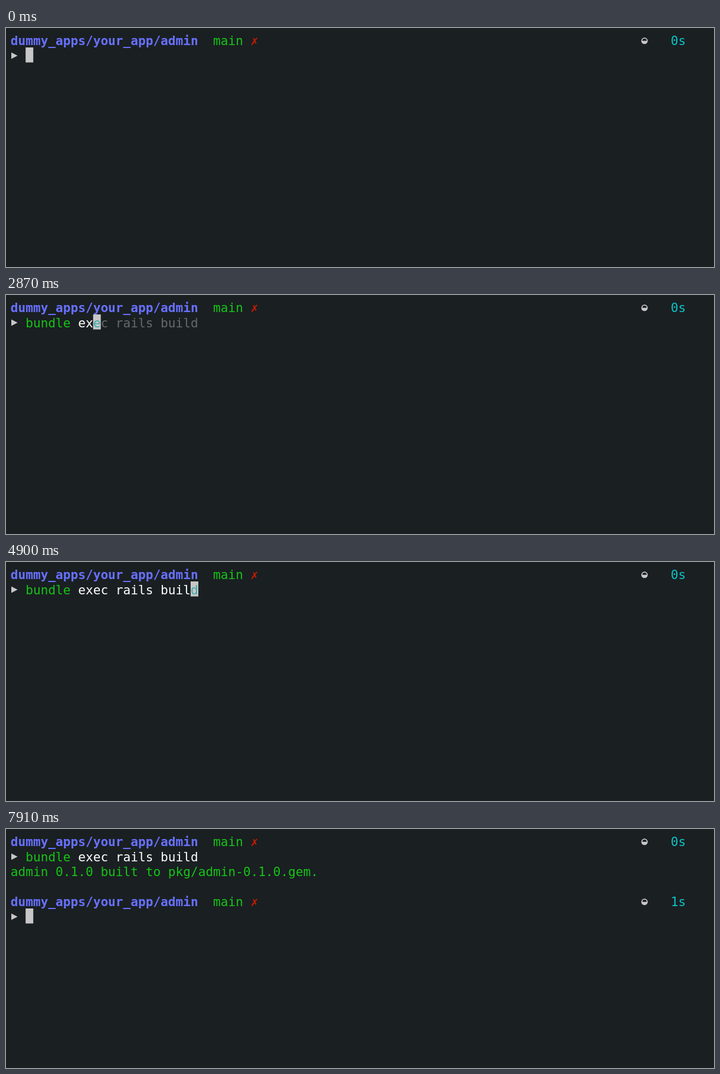
Animation of 1200 by 406 pixels, one loop 7.98 s. Source, as an HTML page with a canvas:

```html
<!DOCTYPE html>
<html lang="en">
<head>
<meta charset="utf-8">
<title>Terminal</title>
<style>
html, body { margin: 0; height: 100%; overflow: hidden; background: #1a1f22; }
canvas { display: block; }
</style>
</head>
<body>
<canvas id="screen" width="1200" height="406"></canvas>
<script>
const ctx = document.getElementById('screen').getContext('2d');
const LOOP = 7980, LEFT = 7.8, TOP = 7.5, CELL = 12.715, LINE = 25.5;
const BG = '#1a1f22', GREY = '#c7c7c7', GREEN = '#15c415', BLUE = '#6871ff',
  RED = '#c91b00', BRIGHT_RED = '#ff6d67', CYAN = '#0cc5c7', WHITE = '#feffff',
  HINT = '#666969', UNDER_CURSOR = '#3fa9ab';
const COMMAND = 'bundle exec rails build';
const ENTER = 5670, OUTPUT = 6720, PROMPT = 6930;

// Time at which the nth character has been typed: slow start, pause, steady run, last letters
function keyTime(n) {
  if (n <= 3) return 1050 + 210 * (n - 1);
  if (n <= 20) return 2100 + 150 * (n - 4);
  return 4760 + 140 * (n - 21);
}

const colX = col => LEFT + col * CELL;
const rowY = row => TOP + row * LINE;

function write(text, col, row, color, bold = false) {
  ctx.font = `${bold ? 'bold ' : ''}21.12px "DejaVu Sans Mono", monospace`;
  ctx.fillStyle = color;
  [...text].forEach((ch, i) => ctx.fillText(ch, colX(col + i), rowY(row) + 21.5));
}

function cursor(col, row) {
  ctx.fillStyle = GREY;
  ctx.fillRect(colX(col), rowY(row), 13, LINE);
}

function prompt(row, seconds) {
  write('dummy_apps/your_app/admin', 0, row, BLUE, true);
  write('main', 27, row, GREEN);
  write('✗', 32, row, RED);
  write(seconds + 's', 88, row, CYAN);

  const y = rowY(row) + 14.3;
  ctx.fillStyle = ctx.strokeStyle = GREY;
  ctx.lineWidth = 1.8;
  ctx.beginPath();
  ctx.arc(1082.2, y, 4.6, 0, 2 * Math.PI);
  ctx.stroke();
  ctx.beginPath();
  ctx.arc(1082.2, y, 5, 0, Math.PI);
  ctx.fill();

  const mid = rowY(row + 1) + 14;
  ctx.beginPath();
  ctx.moveTo(9, mid - 5.4);
  ctx.lineTo(19.6, mid);
  ctx.lineTo(9, mid + 5.4);
  ctx.fill();
}

function command(t) {
  let n = 0;
  while (n < COMMAND.length && t >= keyTime(n + 1)) n++;
  const known = n >= 6;
  write(COMMAND.slice(0, Math.min(n, 6)), 2, 1, known ? GREEN : BRIGHT_RED, !known);
  write(COMMAND.slice(6, Math.max(n, 6)), 8, 1, WHITE);
  if (t >= ENTER) return;
  cursor(2 + n, 1);
  if (!n) return;
  write(COMMAND.slice(n, n + 1), 2 + n, 1, UNDER_CURSOR);
  write(COMMAND.slice(n + 1), 3 + n, 1, HINT);
}

function draw(t) {
  ctx.fillStyle = BG;
  ctx.fillRect(0, 0, 1200, 406);
  prompt(0, 0);
  command(t);
  if (t >= OUTPUT) write('admin 0.1.0 built to pkg/admin-0.1.0.gem.', 0, 2, GREEN);
  if (t >= PROMPT) {
    prompt(4, 1);
    cursor(2, 5);
  } else if (t >= ENTER) {
    cursor(0, t >= OUTPUT ? 3 : 2);
  }
}

const start = performance.now();
function tick() {
  draw((performance.now() - start) % LOOP);
  requestAnimationFrame(tick);
}
tick();
</script>
</body>
</html>
```
